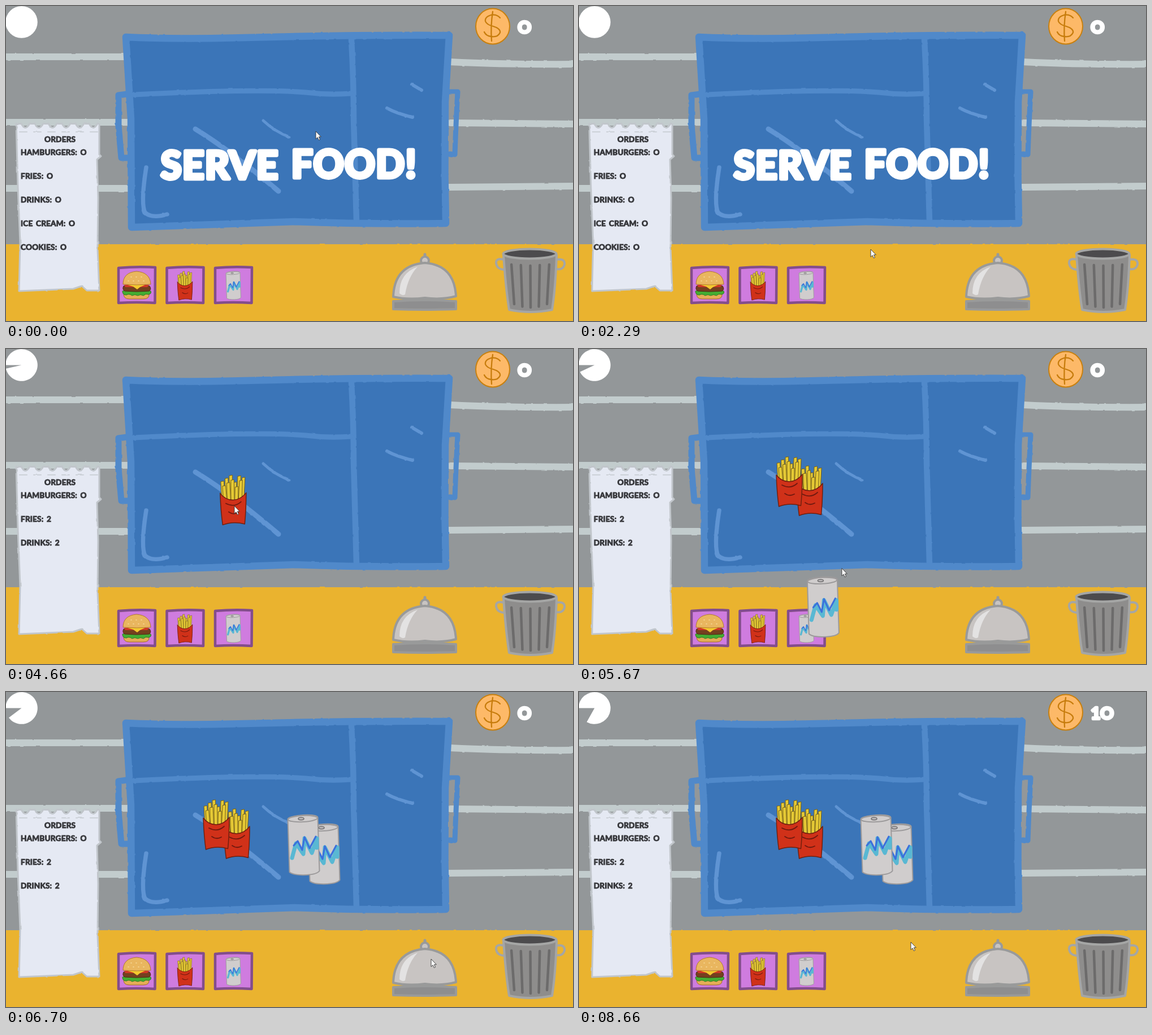
Write an HTML page that moves like this. It is 1003 px wide and 558 px high and loops after 8710 ms.

```html
<!DOCTYPE html>
<html lang="en">
<head>
<meta charset="utf-8">
<title>Serve food</title>
<style>
html, body { margin: 0; width: 100%; height: 100%; overflow: hidden; background: #939799; }
svg { display: block; }
text { font-family: Lato, "Open Sans", sans-serif; font-weight: 700; stroke-linejoin: round; }
.line { fill: none; stroke-linecap: round; stroke-linejoin: round; }
.note { font-size: 13.6px; fill: #38393d; stroke: #38393d; stroke-width: 1; letter-spacing: .2px; word-spacing: 2px; }
.white { fill: #fff; stroke: #fff; }
</style>
</head>
<body>
<svg width="1003" height="558" viewBox="0 0 1003 558">
  <defs>
    <filter id="rough" filterUnits="userSpaceOnUse" x="-20" y="-20" width="1043" height="598" color-interpolation-filters="sRGB">
      <feTurbulence type="fractalNoise" baseFrequency=".08" numOctaves="2" seed="4"/>
      <feDisplacementMap in="SourceGraphic" scale="2.500" xChannelSelector="R" yChannelSelector="G"/>
    </filter>

    <g id="fries" stroke-linejoin="round">
      <g id="sticks" fill="#e6ca35" stroke="#75601a"></g>
      <path d="M-23,-11 Q-14,1 0,1 Q14,0 23,-12 Q23,18 20.500,43.500 Q0,38 -18.500,45 Q-22,20 -23,-11Z" fill="#d03119" stroke="#70200f" stroke-width="1.500"/>
      <path class="line" d="M-13,7 Q2,15 14,4 M-8,22 Q0,28 9,23" stroke="#701a10" stroke-width="1.800"/>
    </g>

    <g id="can" stroke-linejoin="round">
      <path d="M-27.500,-46 Q-26,-51 0,-53 Q24,-54 25.500,-49 L28.500,46 Q24,52 6,53 Q-18,54 -24.500,48Z" fill="#d0cdcd" stroke="#9c9a9b" stroke-width="2"/>
      <ellipse cx="-1" cy="-46.500" rx="26" ry="5.500" transform="rotate(-3 -1 -46)" fill="#d0cdcd" stroke="#9c9a9b" stroke-width="2"/>
      <ellipse cx="-4" cy="-46.500" rx="5" ry="2.200" fill="#bdbabb" stroke="#6f6d6e" stroke-width="1.500"/>
      <path class="line" d="M-20,23 L-13,-3 L0,16 L2,-12 L15,14 L24,-12 V5" stroke="#59b8d3" stroke-width="7"/>
      <path class="line" d="M-17,1 L-10,-7 L-2,9 L2,-14 L11,6 L22,-15" stroke="#3b70dc" stroke-width="3"/>
    </g>

    <g id="burger" stroke-linejoin="round">
      <path d="M-23,15 H22 Q23,24 12,24 H-13 Q-23,24 -23,15Z" fill="#e5ad56" stroke="#a56c24"/>
      <path d="M-25,10 Q0,4 25,10 Q27,15 21,16 Q16,14 12,18 Q7,15 2,18 Q-3,15 -8,18 Q-13,14 -18,17 Q-25,17 -25,10Z" fill="#43ad32" stroke="#2c7b23"/>
      <path d="M-23,1 Q0,-1 23,1 Q27,7 22,10 Q0,12 -21,10 Q-26,7 -23,1Z" fill="#74401f" stroke="#4f2a14"/>
      <path d="M-22,-1 H22 L19,3 H-20Z" fill="#cf3824"/>
      <path d="M-19,-2 H17 L6,3 L1,7 L-6,2Z" fill="#f3c92f"/>
      <path d="M-24,-2 Q-24,-23 0,-25 Q24,-23 25,-2 Q0,0 -24,-2Z" fill="#e9b65f" stroke="#b27a2d"/>
      <path class="line" d="M-15,-8 H16 M-10,-15 H12" stroke="#f7dda0" stroke-width="1.500" stroke-dasharray="1 8"/>
    </g>
  </defs>

  <rect width="1003" height="558" fill="#939799"/>

  <g filter="url(#rough)">
    <path class="line" d="M-15,90 H212 M-15,206 H216 M-15,323 H216 M786,99 Q880,104 1018,103 M786,207 L1018,209 M782,321 L1018,319" stroke="#c2cccd" stroke-width="12"/>
    <rect x="-15" y="422" width="1040" height="160" fill="#eab32f"/>

    <g class="line" stroke="#5089ca">
      <path d="M214,156 L199,158 L199,212 L204,269 L216,269" stroke-width="11"/>
      <path d="M784,152 L799,152 Q796,205 794,263 L785,262" stroke-width="9"/>
      <path d="M212,55 Q300,59 400,56.500 Q600,51 784,52 L777,170 L776.500,300 L778,385 Q640,387 510,382 Q400,386 222,392 L221,200Z" fill="#3b75b8" stroke-width="12.500"/>
      <path d="M611,60 Q615,130 615,200 L620,382" stroke-width="10.500"/>
      <path d="M226,157 Q450,146 530,153 Q570,158 610,155" stroke-width="9"/>
    </g>
    <g class="line" stroke="#5f94d3">
      <path d="M335,218 Q400,258 482,328" stroke-width="9"/>
      <path d="M455,203 Q475,222 501,232" stroke-width="5"/>
      <path d="M674,181 Q690,190 719,197 M718,139 L735,149" stroke-width="6"/>
      <path d="M248,286 Q238,350 246,366 Q258,377 285,369" stroke-width="7.500"/>
    </g>

    <path id="receipt" fill="#e5e9f3" stroke="#c1c6cb" stroke-width="3" stroke-linejoin="round"/>
    <path class="line" d="M24,223 H162" stroke="#ccd1d8" stroke-width="2" stroke-dasharray="13 12"/>
  </g>

  <g class="line" stroke="#a5a6a5" stroke-width="4">
    <path d="M880,449 Q866,446 867,456 Q869,467 882,467 M975,449 Q989,447 988,458 Q985,468 974,466"/>
    <path d="M880,441 Q884,500 890,538 Q928,546 966,538 Q972,500 974,441Z" fill="#8e8d8c"/>
    <ellipse cx="926.500" cy="439" rx="47" ry="8.500" fill="#4c4b4d"/>
  </g>
  <g id="ridges" class="line" stroke="#6c6b6b" stroke-width="4.500"></g>

  <g class="line" stroke="#999a9a" stroke-width="4">
    <path d="M741,440 V446" stroke-width="5"/>
    <circle cx="741" cy="451" r="7" fill="#c8c4c2"/>
    <path d="M685,515 Q687,459 741,455 Q793,459 796,514 Q770,521 741,517 Q710,521 685,515Z" fill="#c8c4c2"/>
    <path d="M685,523 Q740,519 796,523 V537 Q740,539 685,537Z" fill="#8e8e8f"/>
  </g>
  <path d="M696,509 Q696,473 728,462 Q711,480 706,511 Q701,514 696,509Z" fill="#e3e2e2"/>

  <g id="slots"></g>

  <ellipse cx="861" cy="36" rx="30" ry="31.500" fill="#fdb968" stroke="#c8800f" stroke-width="2"/>
  <path class="line" d="M874,21 Q868,14 858,16 Q847,19 848,27 Q850,33 862,36 Q875,40 874,47 Q870,56 858,54 Q849,53 846,46 M861,10 Q857,35 859,62" stroke="#c77c0c" stroke-width="2.300"/>
  <text id="coins" class="white" x="905.500" y="47.500" font-size="29" stroke-width="4.500">O</text>

  <path id="timer" fill="#fff"/>
  <text class="note" x="68" y="241">ORDERS</text>
  <g id="orders"></g>

  <g id="items"></g>
  <g id="title" class="white" font-size="66" stroke-width="7" letter-spacing="2">
    <text x="274" y="306">SERVE</text>
    <text x="505" y="304">FOOD!</text>
  </g>
  <path id="cursor" d="M0,0 V13.500 L3.100,10.700 L5.300,15.500 L7.500,14.500 L5.400,9.800 H9.300Z" fill="#fff" stroke="#333" stroke-width=".9"/>
</svg>

<script>
const LOOP = 8710, START = 3490, TIMER_START = 3600, PAID = 7150;
const DRAG = 340, LAG = 55, SLOT_Y = 495;
const $ = id => document.getElementById(id);
const range = n => [...Array(n).keys()];

function add(parent, tag, attrs, text) {
  const el = document.createElementNS('http://www.w3.org/2000/svg', tag);
  for (const k in attrs) el.setAttribute(k, attrs[k]);
  if (text) el.textContent = text;
  return parent.appendChild(el);
}
const place = (el, [x, y]) => el.setAttribute('transform', `translate(${x.toFixed(2)} ${y.toFixed(2)})`);
const show = (el, on) => el.setAttribute('visibility', on ? 'visible' : 'hidden');

// Two rows of sticks fanning out of the carton
for (const row of [0, 1]) for (const i of range(6 - row)) {
  const foot = -20 + i * 6.6 + row * 3, lean = (i - 2.2) * .9;
  const top = -37 + row * 8 - 7 * Math.sin(i * 2.3 + 4);
  add($('sticks'), 'path', { d: `M${foot + lean},${top} l5.5,-1 L${foot + 6},2 h-6Z` });
}

const scallops = range(6).map(() => 'q5,1 9,0 q7,15 15,0').join(' ');
$('receipt').setAttribute('d', `M18,208 ${scallops} L165,209 V263 L168,266 L161,272 L163,340 L162,430 `
  + 'L165,504 H143 L134,496 L119,501 L23,505 L25,420 L21,320Z');

for (const i of range(5)) {
  const side = i - 2;
  add($('ridges'), 'path', { d: `M${927.5 + side * 16.7},${460 - Math.abs(side)} L${928 + side * 14.5},${534 - side * side * 1.5}` });
}

const slots = { burger: [231, 1], fries: [316.5, .58], can: [402, .47] };
for (const kind in slots) {
  const [x, scale] = slots[kind];
  add($('slots'), 'path', {
    d: `M${x - 32},464 Q${x},461 ${x + 33},463 L${x + 32.5},526 Q${x},524 ${x - 32},526Z`,
    fill: '#cf7cdf', stroke: '#834d8c', 'stroke-width': 4.5, 'stroke-linejoin': 'round'
  });
  add($('slots'), 'use', { href: '#' + kind, transform: `translate(${x} ${SLOT_Y}) scale(${scale})` });
}

const orders = ['HAMBURGERS', 'FRIES', 'DRINKS', 'ICE CREAM', 'COOKIES'].map((name, i) => ({
  name, final: [' O', ' 2', ' 2'][i],
  el: add($('orders'), 'text', { class: 'note', x: 26, y: 263.5 + 42.1 * i })
}));

// Two of each kind, dragged one after another; the second lands up and left of the first
const drops = { fries: [408, 250], can: [562, 287] };
const items = ['fries', 'fries', 'can', 'can'].map((kind, i) => {
  const [x, y] = drops[kind], second = i % 2;
  return {
    press: 4320 + 601.5 * i,
    from: [slots[kind][0], SLOT_Y],
    to: [x - 36 * second, y - 16 * second],
    el: add($('items'), 'use', { href: '#' + kind })
  };
});

// Cursor moves: start, end, x, y
const moves = [
  [670, 1160, 513, 447], [1950, 2090, 516, 431], [2290, 3300, 394, 415], [START, 3980, 385, 387],
  ...items.flatMap(({ press, from, to }) => [
    [press - 250, press - 20, ...from],
    [press, press + DRAG, to[0] - 4, to[1] + 28]
  ]),
  [6480, 6700, 752, 473], [7200, 8660, 587, 443]
];

const mix = (a, b, k) => a + (b - a) * k;
function ease(t, start, end) {
  const u = Math.min(1, Math.max(0, (t - start) / (end - start)));
  return u * u * (3 - 2 * u);
}

// Each move bows a little: y runs ahead of x
function cursorAt(t) {
  return moves.reduce(([px, py], [start, end, x, y]) => {
    const k = ease(t, start, end);
    return [mix(px, x, k), mix(py, y, Math.sin(k * Math.PI / 2))];
  }, [548, 222]);
}

function pie(deg) {
  const x = 27.5, y = 28.5, r = 28.3, a = deg * Math.PI / 180;
  if (deg <= 0) return `M${x - r},${y} a${r},${r} 0 1 1 ${2 * r},0 a${r},${r} 0 1 1 ${-2 * r},0Z`;
  return `M${x},${y} L${x - r},${y} A${r},${r} 0 1 1 ${x - r * Math.cos(a)},${y + r * Math.sin(a)}Z`;
}

function draw(t) {
  const playing = t >= START;
  show($('title'), !playing);
  for (const { name, final, el } of orders) {
    show(el, !playing || final);
    el.textContent = name + ':' + (playing && final || ' O');
  }
  $('timer').setAttribute('d', pie((t - TIMER_START) * .012));
  $('coins').textContent = t >= PAID ? '1O' : 'O';
  for (const { press, from, to, el } of items) {
    const k = ease(t, press + LAG, press + LAG + DRAG);
    show(el, t >= press);
    place(el, [mix(from[0], to[0], k), mix(from[1], to[1], k)]);
  }
  place($('cursor'), cursorAt(t));
}

const began = performance.now();
function tick() {
  draw((performance.now() - began) % LOOP);
  requestAnimationFrame(tick);
}
tick();
</script>
</body>
</html>
```
